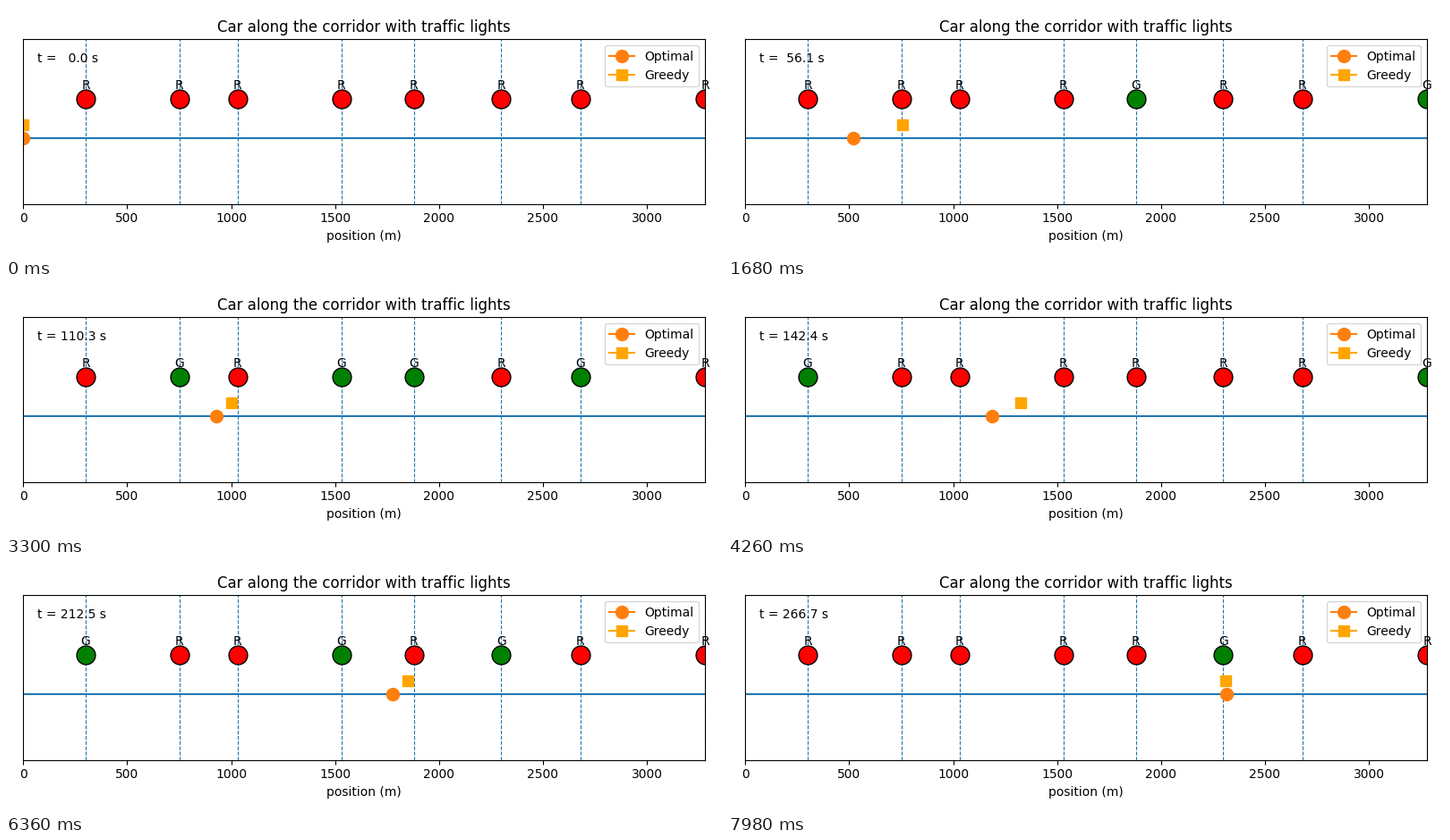
Write a matplotlib script that moves like this. It is 800 by 280 pixels and loops after 8000 ms.

```python
import numpy as np
import matplotlib.pyplot as plt
from matplotlib.animation import FuncAnimation

LOOP_MS, TICK_MS, STEP_MS = 8000, 20, 30
SECONDS_PER_STEP = 400 / 399
ROAD = 3280

# position (m), cycle (s), start of green (s)
LIGHTS = [(300, 65, 11), (750, 70, 21), (1030, 60, 1), (1530, 80, 29.5),
          (1880, 61, 39), (2300, 60, 25), (2680, 70, 28), (ROAD, 90, 41)]
GREEN_SHARE = 0.305

V_OPT = 48 / 3.6
V_MAX, ACCEL, OVERSHOOT = 60 / 3.6, 2.0, 8


def is_green(t, cycle, start):
    return (t - start) % cycle < GREEN_SHARE * cycle


def next_green(t, cycle, start):
    return t if is_green(t, cycle, start) else t + (start - t) % cycle


def plan_optimal():
    """Times and places of passing each light, never meeting a red one."""
    times, places = [0], [0]
    for pos, *timing in LIGHTS:
        arrive = times[-1] + (pos - places[-1]) / V_OPT
        times.append(next_green(arrive, *timing))
        places.append(pos)
    return times, places


def plan_greedy():
    """Trips (departure, from, to) between the red lights met at full speed."""
    trips, t, x = [], 0, 0
    for pos, *timing in LIGHTS:
        arrive = t + (pos - x) / V_MAX + V_MAX / ACCEL / 2
        go = next_green(arrive, *timing)
        if go > arrive:
            stop = pos + OVERSHOOT
            trips.append((t, x, stop))
            t, x = go, stop
    return trips


def travel(t, dist):
    """Distance covered after t seconds of speeding up, cruising and braking."""
    ramp = V_MAX / ACCEL
    total = dist / V_MAX + ramp
    if t >= total:
        return dist
    if t < ramp:
        return ACCEL * t * t / 2
    if t > total - ramp:
        return dist - ACCEL * (total - t) ** 2 / 2
    return V_MAX * (t - ramp / 2)


def greedy_pos(t):
    depart, start, stop = [trip for trip in TRIPS if trip[0] <= t][-1]
    return start + travel(t - depart, stop - start)


OPT_T, OPT_X = plan_optimal()
TRIPS = plan_greedy()

fig, ax = plt.subplots(figsize=(8, 2.8), dpi=100)
ax.set_xlim(0, ROAD)
ax.set_ylim(-1, 1.5)
ax.set_yticks([])
ax.set_xlabel("position (m)")
ax.set_title("Car along the corridor with traffic lights")

ax.plot([0, ROAD], [0, 0], color="C0")
lamps, labels = [], []
for x, *_ in LIGHTS:
    ax.axvline(x, color="C0", ls="--", lw=0.8)
    lamps += ax.plot([x], [0.6], marker="o", ms=15, mec="black")
    labels.append(ax.text(x, 0.7, "R", ha="center", va="bottom"))
optimal, = ax.plot([0], [0], marker="o", ms=10, color="C1", label="Optimal")
greedy, = ax.plot([0], [0.2], marker="s", ms=8, color="orange", label="Greedy")
clock = ax.text(0.02 * ROAD, 1.15, "")
ax.legend(loc="upper right")
fig.tight_layout()
fig.subplots_adjust(right=781 / 800)


def update(i):
    step = (i * TICK_MS + TICK_MS // 2) // STEP_MS
    t = step * SECONDS_PER_STEP
    for (_, *timing), lamp, label in zip(LIGHTS, lamps, labels):
        green = is_green(t, *timing)
        lamp.set_markerfacecolor("green" if green else "red")
        label.set_text("G" if green else "R")
    optimal.set_data([np.interp(t, OPT_T, OPT_X)], [0])
    greedy.set_data([greedy_pos(t)], [0.2])
    clock.set_text(f"t = {t:5.1f} s")
    return [*lamps, *labels, optimal, greedy, clock]


anim = FuncAnimation(fig, update, frames=LOOP_MS // TICK_MS, interval=TICK_MS,
                     init_func=lambda: update(0), repeat=True, repeat_delay=0)
plt.show()
```
